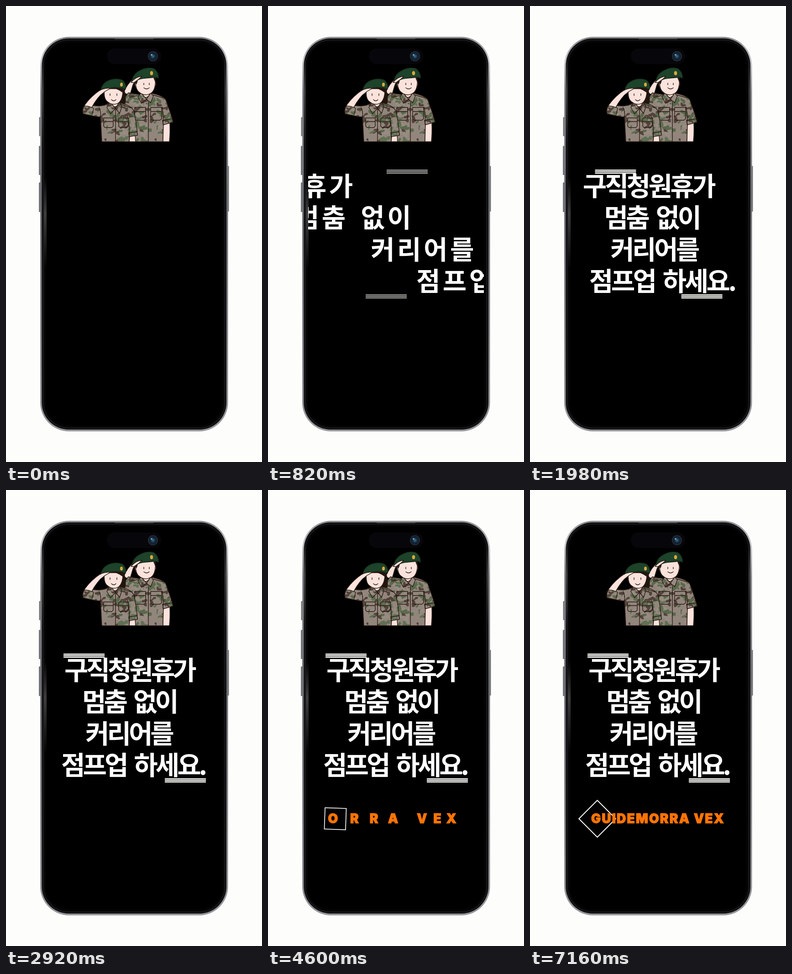
Animation, 561 px wide and 998 px high, one loop 7.18 s. Source, as an HTML page:

```html
<!DOCTYPE html>
<html lang="ko">
<head>
<meta charset="utf-8">
<title>Phone</title>
<style>
html, body { margin: 0; width: 100%; height: 100%; overflow: hidden; background: #fdfdfc; }
svg { display: block; width: 561px; height: 998px; }
#lines text { font: 700 57px "Noto Sans CJK KR", "Noto Sans CJK", sans-serif; word-spacing: 6px; fill: #fff; white-space: pre; }
#brand { font: 900 28px Inter, sans-serif; letter-spacing: 2.2px; fill: #ff7404; stroke: #ff7404; stroke-width: 1.3; white-space: pre; }
.skin { fill: #fbe3dc; }
.ink { stroke: #2b1a14; stroke-width: 1.4; stroke-linejoin: round; stroke-linecap: round; }
.line { fill: none; }
.camo { fill: url(#camo); }
.hair { fill: #21150f; }
.beret { fill: #1d432a; stroke: #17301d; }
.badge { fill: #d9a93c; }
</style>
</head>
<body>
<svg viewBox="0 0 561 998">
  <defs>
    <linearGradient id="rim" x2="0" y2="1">
      <stop offset="0" stop-color="#8a8a8d"/>
      <stop offset=".06" stop-color="#c8c8ca"/>
      <stop offset=".14" stop-color="#8a8a8e"/>
      <stop offset=".4" stop-color="#6c6d71"/>
      <stop offset=".75" stop-color="#828286"/>
      <stop offset="1" stop-color="#98989c"/>
    </linearGradient>
    <linearGradient id="shine" x2="0" y2="1">
      <stop offset="0" stop-color="#777" stop-opacity="0"/>
      <stop offset=".4" stop-color="#777" stop-opacity=".5"/>
      <stop offset="1" stop-color="#777" stop-opacity="0"/>
    </linearGradient>
    <radialGradient id="lens">
      <stop offset="0" stop-color="#3f7390"/>
      <stop offset=".4" stop-color="#17324a"/>
      <stop offset=".7" stop-color="#101a28"/>
      <stop offset="1" stop-color="#2a343c"/>
    </radialGradient>
    <pattern id="camo" width="110" height="110" patternUnits="userSpaceOnUse">
      <rect width="110" height="110" fill="#92867c"/>
      <g id="blobs" fill="none" stroke-linecap="round" stroke-linejoin="round"/>
    </pattern>
    <clipPath id="screen"><rect x="88" y="81" width="385" height="836" rx="48"/></clipPath>
    <g id="bar">
      <rect width="90" height="2.4"/><rect y="3.4" width="90" height="2.4"/><rect y="6.8" width="90" height="2.4"/>
    </g>
  </defs>

  <rect width="561" height="998" fill="#fdfdfc"/>

  <g fill="#737478">
    <rect x="72.5" y="243" width="5" height="42" rx="1.5"/>
    <rect x="72" y="306" width="5" height="64" rx="1.5"/>
    <rect x="72" y="386" width="5" height="65" rx="1.5"/>
    <rect x="484" y="350" width="4.5" height="100" rx="1.5"/>
  </g>
  <rect x="75" y="67.5" width="411.5" height="863.5" rx="63" fill="url(#rim)"/>
  <rect x="78.5" y="71" width="404.5" height="856" rx="59" fill="#040405"/>
  <rect x="81.5" y="74" width="398.5" height="850" rx="56" fill="none" stroke="#151517" stroke-width="4"/>
  <rect x="238" y="71" width="85" height="2" fill="#333336"/>
  <rect x="88" y="81" width="385" height="836" rx="48"/>
  <rect x="83" y="375" width="6" height="200" fill="url(#shine)"/>
  <rect x="79" y="110" width="3" height="190" fill="url(#shine)"/>
  <rect x="479.5" y="110" width="3" height="190" fill="url(#shine)"/>
  <rect x="221" y="93" width="119" height="34" rx="17" fill="#07070b"/>
  <circle cx="322" cy="110" r="11" fill="url(#lens)"/>
  <circle cx="319" cy="107" r="2" fill="#6d9db0"/>

  <g class="ink">
    <!-- man -->
    <path class="skin" d="M258 189 Q267 168 279 160 Q288 153 298 154 L291 161 Q282 165 278 173 L271 197 Z"/>
    <path class="camo" d="M256 212 Q262 196 268 190 L293 194 L319 191 Q344 196 350 205 Q358 226 366 252 L345 259 L344 297 L272 297 L262 222 Z"/>
    <path class="skin" d="M345 259 L359 256 Q360 278 358 297 L344 297 Z"/>
    <path class="camo" d="M343 250 L364 247 L366 254 L345 260 Z"/>
    <path class="skin" d="M296 184 V194 Q305 206 316 194 V184 Z"/>
    <path class="camo" d="M296 190 L289 199 L297 213 L308 204 Z M317 190 L323 197 L317 212 L308 204 Z"/>
    <path class="line" d="M312 210 V297 M282 222 H306 V247 L302 250 H286 L282 247 Z M282 231 H306 M317 222 H341 V247 L337 250 H321 L317 247 Z M317 231 H341 M344 259 Q346 240 342 221 M323 195 L344 201 M271 200 L288 196"/>
    <path class="skin" d="M285 165 Q280 168 284 178 L287 178 M327 165 Q331 170 326 178"/>
    <path class="skin" d="M284 160 Q283 180 290 187 Q305 201 320 189 Q329 180 327 156 Z"/>
    <path class="hair" d="M283 163 L288 161 Q288 167 285 171 Z M326 157 L328 167 L324 158 Z"/>
    <path class="beret" d="M276 165 Q278 149 294 141 Q309 133 324 137 Q335 145 334 158 Q327 153 308 157 Q290 159 282 166 Z"/>
    <ellipse class="badge" cx="319" cy="147" rx="3.3" ry="4.5" stroke="none"/>
    <path class="line" d="M302 169 V172.5 M314 169 V172.5 M302 179 Q308 184 314 179"/>
    <path class="skin" d="M274 167 Q285 154 298 154 L291 160 L280 168 Z"/>

    <!-- woman -->
    <path class="hair" d="M247 182 L258 181 Q264 199 261 212 Q254 219 247 210 Z"/>
    <path class="camo" d="M169 236 Q177 225 182 216 Q200 221 216 217 L231 210 L250 212 Q273 217 280 229 Q286 254 288 282 L270 286 L270 297 L210 297 L207 243 Q193 242 169 236 Z"/>
    <path class="skin" d="M271 285 L283 283 L284 297 H270 Z"/>
    <path class="camo" d="M269 278 L287 275 L288 283 L270 286 Z"/>
    <path class="skin" d="M229 205 V216 Q239 226 248 214 V205 Z"/>
    <path class="camo" d="M228 210 L221 222 L229 236 L240 224 Z M248 210 L254 220 L249 235 L240 224 Z"/>
    <path class="line" d="M240 226 V297 M214 245 H235 V263 L232 266 H217 L214 263 Z M214 253 H235 M247 245 H268 V263 L265 266 H250 L247 263 Z M247 253 H268 M270 286 Q272 262 266 241 M207 243 Q209 232 204 222 M253 216 L274 223"/>
    <path class="skin" d="M216 181 Q213 202 222 209 Q235 220 248 211 Q257 202 256 181 Z"/>
    <path class="hair" d="M216 185 Q224 184 230 179 Q243 179 256 189 L257 178 L218 176 Z"/>
    <path class="beret" d="M208 184 Q211 168 228 162 Q244 157 256 163 Q264 171 262 182 Q252 177 236 178 Q220 180 213 187 Z"/>
    <ellipse class="badge" cx="253" cy="172" rx="3" ry="4.3" stroke="none"/>
    <path class="line" d="M228 192 V196 M243 192 V196 M231 205 Q236 210 241 205"/>
    <path class="skin" d="M168 224 Q178 206 198 190 Q212 178 229 180 L217 187 L207 195 Q193 210 184 230 Z"/>
    <path class="camo" d="M169 236 Q166 228 172 219 Q181 218 192 224 L188 240 Z"/>
  </g>

  <g clip-path="url(#screen)">
    <g id="lines"></g>
    <g fill="#fffffa">
      <use id="barTop" href="#bar"/>
      <use id="barLow" href="#bar"/>
    </g>
    <rect id="box" x="-28.5" y="-28.5" width="57" height="57" fill="none" stroke="#fff" stroke-width="2"/>
    <text id="brand" x="134" y="729"></text>
  </g>
</svg>
<script>
const LOOP = 7180;
const NS = "http://www.w3.org/2000/svg";
const $ = id => document.getElementById(id);
const add = (parent, tag, attrs = {}, text = "") => {
  const el = parent.appendChild(document.createElementNS(NS, tag));
  for (const name in attrs) el.setAttribute(name, attrs[name]);
  el.textContent = text;
  return el;
};
const clamp = v => Math.max(0, Math.min(1, v));

// Camouflage: seeded wandering strokes
let seed = 11;
const rnd = () => (seed = (seed * 16807) % 2147483647) / 2147483647;
const tones = ["#586a4b", "#51433a", "#607054", "#988c82"];
for (let i = 0; i < 130; i++) {
  let x = rnd() * 110, y = rnd() * 110, d = `M${x} ${y}`;
  for (let j = 0; j < 3; j++) d += `L${x += rnd() * 14 - 7} ${y += rnd() * 10 - 5}`;
  add($("blobs"), "path", { d, stroke: tones[i % 4], "stroke-width": 3.5 + rnd() * 2.5 });
}

// Headline: resting x, starting shift
const lines = [
  ["구직청원휴가", 128, -822],
  ["멈춤 없이", 167, -310],
  ["커리어를", 174, 148],
  ["점프업 하세요.", 121, 590]
].map(([text, x, shift], i) => ({ el: add($("lines"), "text", { y: 414.5 + 69.5 * i }, text), x, shift }));

const letters = [..."GUIDEMORRA VEX"].map(c => add($("brand"), "tspan", {}, c));

// Steps advance in an uneven 20-100-20 ms rhythm
function stepAt(t) {
  const m = t % 140;
  return 3 * Math.floor(t / 140) + (m < 20 ? 0 : m < 120 ? 1 : 2);
}

function draw(k) {
  const rest = 1 - clamp(k / 57);
  const slide = rest ** 3;
  for (const { el, x, shift } of lines) {
    el.setAttribute("x", x + shift * slide);
    el.style.letterSpacing = -5 + 30.5 * slide + "px";
    el.setAttribute("opacity", clamp(k / 8));
  }

  const gap = 272 * rest ** 2;
  const fade = 1 - rest ** 2.4;
  [["barTop", 126 + gap, 358], ["barLow", 348 - gap, 631]].forEach(([id, x, y]) => {
    $(id).setAttribute("transform", `translate(${x} ${y})`);
    $(id).setAttribute("opacity", fade);
  });

  const spin = (1 - clamp((k - 86) / 21)) ** 2;
  $("box").setAttribute("transform", `translate(147.5 719.5) rotate(${45 - 234 * spin}) scale(${1 - spin})`);
  $("box").setAttribute("visibility", k > 86 ? "visible" : "hidden");

  // Letters glide in from the left, last one first
  let prev = 0;
  letters.forEach((el, i) => {
    const p = clamp((k - 86.5 - 1.48 * (13 - i)) / 16);
    const off = -150 * (1 - p) ** 2;
    el.setAttribute("dx", off - prev);
    el.setAttribute("fill-opacity", clamp(p * 14));
    el.setAttribute("stroke-opacity", clamp(p * 14));
    prev = off;
  });
}

function tick() {
  draw(stepAt(performance.now() % LOOP));
  requestAnimationFrame(tick);
}
tick();
</script>
</body>
</html>
```
